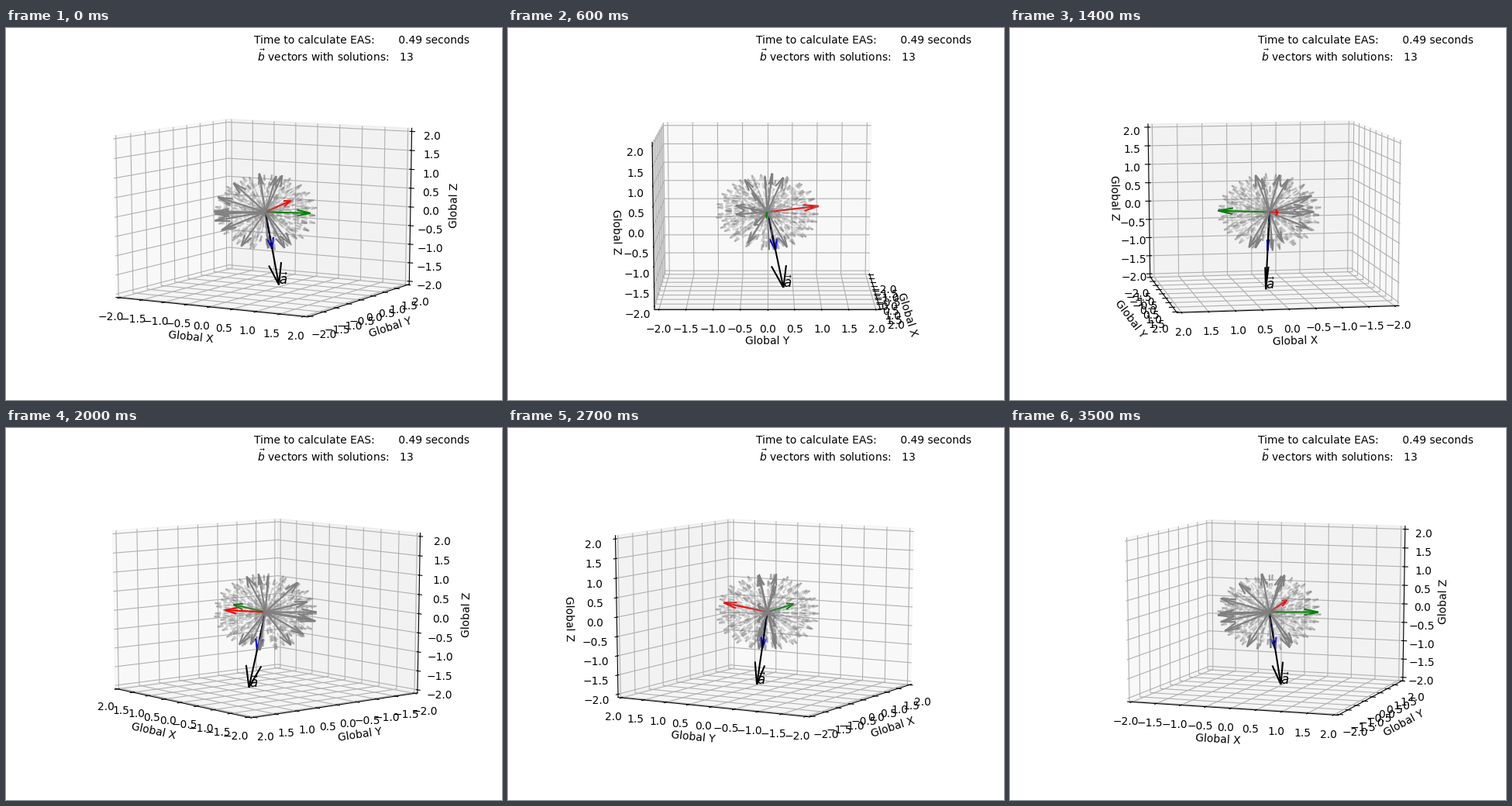
Recreate the animation shown at these times as a matplotlib script. Size 640 by 480 pixels, loop 3600 ms.

```python
import numpy as np
import matplotlib.pyplot as plt
from matplotlib.animation import FuncAnimation

FRAMES = 36
ELEV, AZIM0 = 10, -60
LIM = 2 * 25 / 24
HEADER = ("Time to calculate EAS:       0.49 seconds\n"
          r" $\vec{b}$ vectors with solutions:   13")


def unit(v):
    return v / np.linalg.norm(v, axis=-1, keepdims=True)


def sphere(n):
    """Evenly spread unit vectors on a golden-angle spiral."""
    i = np.arange(n) + 0.5
    z = 1 - 2 * i / n
    phi = np.pi * (1 + 5 ** 0.5) * i
    rho = np.sqrt(1 - z * z)
    return np.column_stack([rho * np.cos(phi), rho * np.sin(phi), z])


def band(n, heading=209):
    """Unit vectors zigzagging along an upright arc that passes both poles."""
    s = np.linspace(1, -1, n)
    t = np.radians(-5 + 114 * s - 14 * np.sin(2 * np.pi * s))
    side = 0.17 * np.cos(np.pi * np.arange(n))
    h = np.radians(heading)
    out = np.cos(t)
    return unit(np.column_stack([out * np.cos(h) + side * np.sin(h),
                                 out * np.sin(h) - side * np.cos(h),
                                 np.sin(t)]))


def arrow(v, color, **style):
    ax.quiver(0, 0, 0, *v, arrow_length_ratio=0.3, color=color,
              linewidths=1.5, **style)


fig = plt.figure(figsize=(6.4, 4.8), dpi=100)
ax = fig.add_subplot(projection="3d")

# a unit cube stretched over the full, non-square subplot
ax.apply_aspect = lambda position=None: None
ax.set_box_aspect((1, 1, 1), zoom=3 ** 0.5 / 1.8294640721620434)

for v in sphere(110):
    arrow(v, "gray", alpha=0.3, linestyles="--")
for v in band(13):
    arrow(v, "gray")

# tilted local frame and the long vector along its third axis
blue = unit(np.array([0.0625, 0.155, -0.985]))
red = unit(np.cross([1, -0.02, 0.06], blue))
green = np.cross(blue, red)
for v, color in ((red, "red"), (green, "green"), (blue, "blue")):
    arrow(v, color)
arrow(2 * blue, "black")
ax.text(*(2 * blue), r"$\vec{a}$", size=12)

for name in "xyz":
    ax.set(**{f"{name}lim": (-LIM, LIM),
              f"{name}ticks": np.arange(-2, 2.1, 0.5),
              f"{name}label": f"Global {name.upper()}"})

fig.text(0.5, 1 - 43 / 480, HEADER, va="baseline")


def update(i):
    azim = AZIM0 + 10 * i
    t = np.radians(azim)
    # tiny nudge so that edge-on views always keep the lower wall
    ax.view_init(ELEV, azim + 1e-6 * (np.cos(t) - np.sin(t)))


anim = FuncAnimation(fig, update, frames=FRAMES, interval=100, repeat=True)
plt.show()
```
